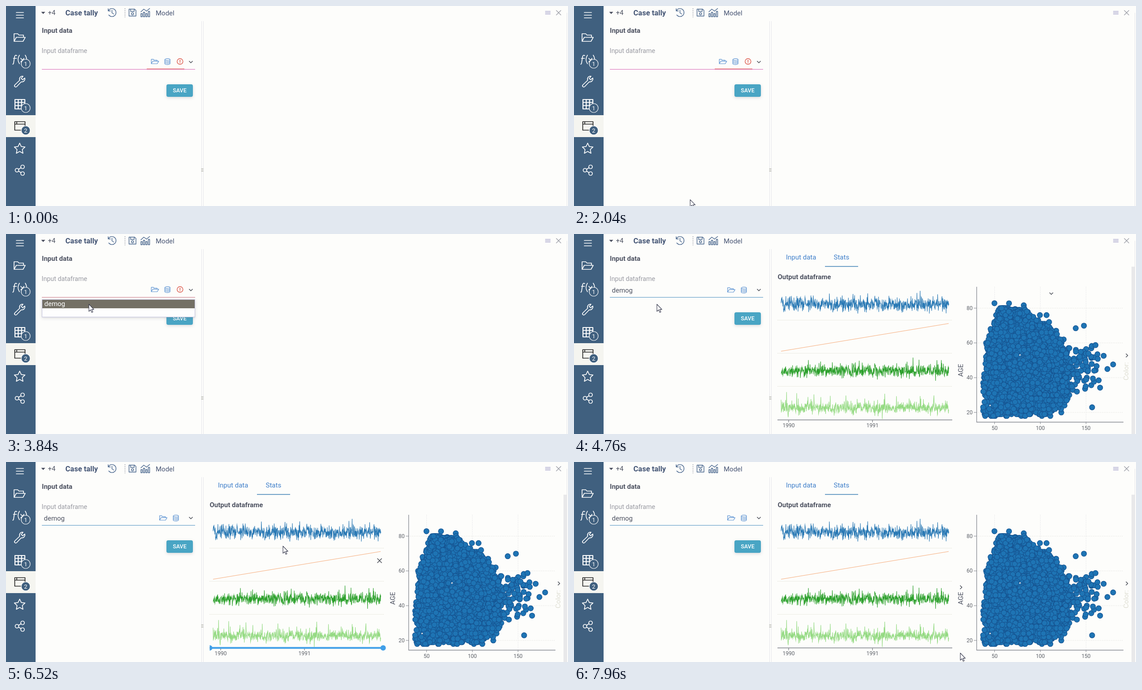
Animation of 1254x447 px, one loop 8 s. Source, as an HTML page with a canvas:

```html
<!DOCTYPE html>
<html lang="en">
<head>
<meta charset="utf-8">
<title>Case tally</title>
<style>
  html, body { margin: 0; width: 100%; height: 100%; overflow: hidden; background: #fdfdfb; }
  svg, canvas { position: absolute; left: 0; top: 0; width: 1254px; height: 447px; }
  text { font: 15px Roboto, sans-serif; fill: #4d5261; }
  .bold { font-weight: 700; }
  .axis { font-size: 12px; fill: #5c6068; }
  .side { fill: none; stroke: #fff; stroke-width: 1.7; stroke-linecap: round; stroke-linejoin: round; }
  .tool { fill: none; stroke: #46648c; stroke-width: 1.4; stroke-linejoin: round; stroke-linecap: round; }
  .pick { fill: none; stroke: #5b92d2; stroke-width: 1.2; stroke-linejoin: round; }
  .mark { fill: none; stroke: #4a4e57; stroke-width: 1.5; }
  .num { font-size: 13px; fill: #fff; text-anchor: middle; }
</style>
</head>
<body>
<svg viewBox="0 0 1254 447">
  <defs>
    <filter id="soft" x="-20%" y="-30%" width="140%" height="180%">
      <feDropShadow dx="0" dy="2" stdDeviation="3" flood-color="#667" flood-opacity=".25"/>
    </filter>
    <path id="folder" d="M.7 11V1.2h4.8l1.6 1.9h6.6v2.3M.7 11 4 5.4h13.3L14 11z"/>
    <g id="disks">
      <ellipse cx="6.5" cy="2.7" rx="5.8" ry="2.1"/>
      <path d="M.7 2.7v9c0 2.8 11.6 2.8 11.6 0v-9M.7 5.7c0 2.8 11.6 2.8 11.6 0M.7 8.7c0 2.8 11.6 2.8 11.6 0"/>
    </g>
    <path id="cross" d="M-5-5 5 5M5-5-5 5"/>
    <path id="chevron" d="M-4-2 0 2 4-2"/>
  </defs>

  <!-- sidebar -->
  <rect width="66" height="447" fill="#40607f"/>
  <rect y="244" width="66" height="49" fill="#f5f5f0"/>
  <g class="side">
    <path d="M23 14.5h16M23 20.5h16M23 26.5h16"/>
    <path d="M18 79V62h8l3 3h10v5M18 79l5-9h20l-5 9z"/>
    <path d="M24 111c-3-2-4.5 0-5 3l-2 13c-.5 3-1 3-2 3M16.5 117h7M30 110c-4 6-4 13 0 19M33 117l7 8M40 117l-7 8M43 110c4 6 4 13 0 19"/>
    <path d="M42 161l-5 4-3-3 4-5c-6-1-9 4-7.5 9L20 176c-3 3 1 7 4 4l10-10.5c5 1 9-3 8-8.5z"/>
    <path d="M20 209h22v21H20zM20 215.5h22M20 222.5h22M27.3 209v21M34.7 209v21" stroke-width="2.2"/>
    <path d="M30.5 306.5l3.6 7.6 8.3 1.1-6.1 5.7 1.6 8.3-7.4-4.1-7.4 4.1 1.6-8.3-6.1-5.7 8.3-1.1z"/>
    <circle cx="24.5" cy="367" r="4"/><circle cx="37" cy="359.5" r="4"/><circle cx="37" cy="374.5" r="4"/>
    <path d="M28 365l5.5-3.500M28 369l5.5 3.500"/>
    <path d="M19.5 258.5h23v19h-23zM20 264h22M24 259v4.5" stroke="#222"/>
  </g>
  <g id="badges"></g>

  <!-- top bar -->
  <path d="M78.5 13h9l-4.5 5z" fill="#4d5261"/>
  <text x="93.500" y="20">+4</text>
  <text class="bold" x="132.500" y="20.500" style="font-size:16.5px;fill:#435474">Case tally</text>
  <g class="tool">
    <path d="M228.500 10.500a9 9 0 1 1 .8 9.500M228 6v5h5M236.500 9.500v6l4 2.500"/>
    <path d="M265.500 5v21" stroke-dasharray="2 2" stroke="#9a9da8" stroke-linecap="butt"/>
    <path d="M274.500 7h12.500l3 3v12.500h-15.500zM278 7v5h8V7"/><circle cx="282.300" cy="17.300" r="2.400"/>
    <path d="M301 24v-7h3v7zM306.500 24V14h3v10zM312 24v-7h3v7zM317.500 24V12h3v12zM301 13l6.500-6 6 4.500 7-6"/>
    <path d="M1203.500 12h11M1203.500 15h11M1203.500 18h11" stroke="#b3b0d2"/>
    <use href="#cross" x="1233" y="15" stroke="#9a9ca5"/>
  </g>
  <text x="334" y="20.500" style="fill:#4b5876">Model</text>

  <!-- panel edges -->
  <path d="M436.500 34v413M440.500 34v413M1251.500 15v432" stroke="#e6e6ea"/>
  <path d="M435.500 363.500h5M435.500 366.500h5M435.500 369.500h5" stroke="#a5a69a"/>

  <!-- form -->
  <text class="bold" x="80" y="60">Input data</text>
  <text x="79.500" y="104.500" style="font-size:14.3px;fill:#9a9ba3">Input dataframe</text>
  <g data-on="0 4000">
    <use class="pick" href="#folder" x="323.500" y="118"/>
    <use class="pick" href="#disks" x="353.700" y="117"/>
    <circle cx="388.300" cy="124" r="6.500" fill="none" stroke="#dc5a4c" stroke-width="1.400"/>
    <path d="M388.300 120.500v4.500M388.300 126.300v1.700" stroke="#dc5a4c" stroke-width="1.700"/>
  </g>
  <g data-on="0 3480">
    <path d="M80 141.500h342" stroke="#d863b4"/>
    <path d="M314 140.500h84" stroke="#e2614c"/>
  </g>
  <path data-on="3480 4000" d="M80 141.500h342" stroke="#cc7484"/>
  <g data-on="4000 8000">
    <text x="84.500" y="130.500">demog</text>
    <use class="pick" href="#folder" x="342" y="119"/>
    <use class="pick" href="#disks" x="372.500" y="118"/>
    <path d="M80 141.500h342" stroke="#4a8fc0"/>
  </g>
  <use class="mark" href="#chevron" x="412.500" y="125"/>
  <rect x="358" y="175" width="59" height="28" rx="4" fill="#48a5c4" filter="url(#soft)"/>
  <text x="387.500" y="193" text-anchor="middle" style="font-size:12.5px;font-weight:500;fill:#fff">SAVE</text>

  <g data-on="2760 3480">
    <rect x="179.500" y="157.500" width="103" height="33" rx="3" fill="#fdfdea" stroke="#dcdfe3"/>
    <text x="185.500" y="179" style="font-size:13.8px;fill:#e0705f">Can't be empty</text>
  </g>
  <g data-on="3560 4000">
    <rect x="80.500" y="146.500" width="341" height="39" fill="#fefefe" stroke="#c3c3de" filter="url(#soft)"/>
    <rect x="81" y="147" width="340" height="19" fill="#747065"/>
    <text x="85.500" y="161" style="fill:#fff">demog</text>
  </g>
</svg>

<canvas id="plots" width="1254" height="447" data-on="4360 8000"></canvas>

<svg viewBox="0 0 1254 447">
  <g data-on="4360 8000">
    <text x="473" y="57" style="fill:#3f7fca">Input data</text>
    <text x="579.500" y="57" style="fill:#3f7fca">Stats</text>
    <path d="M560 72.500h74" stroke="#3a7db4" stroke-width="1.600"/>
    <text class="bold" x="454.500" y="101">Output dataframe</text>
    <rect x="1244" y="73" width="7" height="374" fill="#e9e9ea"/>
    <g id="ticks"></g>
    <text transform="translate(867.500 319) rotate(-90)">AGE</text>
    <text transform="translate(1236.500 327) rotate(-90)" style="font-size:15.5px;fill:#deded2">Color:</text>
    <use class="mark" href="#chevron" transform="translate(1233.500 271.500) rotate(-90)"/>
    <use class="mark" href="#chevron" x="1065" y="133" data-on="4360 6000"/>
  </g>
  <g data-on="6040 7400">
    <path d="M456 415.500h385" stroke="#419fe8" stroke-width="4"/>
    <path d="M454.500 409.500a6 6 0 0 1 0 12z" fill="#419fe8"/>
    <circle cx="841.500" cy="415.500" r="6" fill="#419fe8"/>
    <use class="mark" href="#cross" x="833.500" y="220.500" stroke-width="1.200"/>
  </g>
  <use class="mark" href="#chevron" transform="translate(863.500 280) rotate(-90)" data-on="7400 8000"/>
  <path id="cursor" d="M0 0v16l3.700-3.400 2.600 5.700 2.500-1.100-2.600-5.600h5z" fill="#fff" stroke="#33364a" stroke-width="1.100" stroke-linejoin="round"/>
</svg>

<script>
const LOOP = 8000;

// time, x, y of the pointer tip
const route = [
  [2000, 262, 447], [2160, 245, 360], [2400, 245, 360], [2760, 184, 135],
  [3560, 184, 135], [3800, 185, 157], [5080, 185, 157], [5880, 612, 68],
  [6400, 618, 188], [6760, 618, 188], [7400, 862, 270], [7940, 862, 427]
];

let seed = 20;
function rnd() {
  seed = (seed * 1664525 + 1013904223) % 4294967296;
  return seed / 4294967296;
}
const gauss = () => Math.sqrt(-2 * Math.log(1 - rnd())) * Math.cos(2 * Math.PI * rnd());
const expo = () => -Math.log(1 - rnd());
const smooth = u => u * u * (3 - 2 * u);

function addSvg(parent, name, attrs, text = "") {
  const el = document.createElementNS("http://www.w3.org/2000/svg", name);
  for (const key in attrs) el.setAttribute(key, attrs[key]);
  el.textContent = text;
  document.getElementById(parent).append(el);
}

function badge(y, n) {
  addSvg("badges", "circle", { cx: 44, cy: y, r: 10, fill: "#40607f", stroke: "#fff", "stroke-width": 1.2 });
  addSvg("badges", "text", { class: "num", x: 44, y: y + 4.5 }, n);
}

const tick = (label, x, y, anchor) =>
  addSvg("ticks", "text", { class: "axis", x, y, "text-anchor": anchor }, label);

const ctx = document.getElementById("plots").getContext("2d");

function line(points, color, width = 1, dash = []) {
  ctx.beginPath();
  points.forEach(([x, y]) => ctx.lineTo(x, y));
  ctx.strokeStyle = color;
  ctx.lineWidth = width;
  ctx.setLineDash(dash);
  ctx.stroke();
}

// daily noise over two years; lift adds rare upward peaks
function series(mid, sd, lift, color) {
  const pts = [];
  for (let i = 0; i <= 730; i++) {
    const peak = rnd() < 0.08 ? lift * rnd() : 0;
    pts.push([462 + i * 0.513, mid + sd * gauss() - peak]);
  }
  line(pts, color, 1.1);
}

function drawLines() {
  for (const y of [192.5, 266.5, 340.5]) line([[454, y], [844, y]], "#e4e3d8", 1, [2, 1]);
  series(158, 8, 18, "#2878b4");
  line([[462, 262], [836, 200]], "#f6ac7c", 1.2);
  series(306, 7, 18, "#2ca02c");
  series(389, 6.5, 28, "#94da82");
  line([[454, 415.5], [844, 415.5]], "#7d8088", 1.5);
  [1990, 1991].forEach((year, i) => {
    const x = 479 + 187 * i;
    line([[x, 415], [x, 421]], "#7d8088", 1.3);
    tick(year, x, 432, "middle");
  });
}

const weightX = w => 836.5 + 2.04 * w;
const ageY = a => 476.5 - 3.885 * a;

function dot(x, y) {
  ctx.beginPath();
  ctx.arc(x, y, 5.9, 0, 2 * Math.PI);
  ctx.fill();
  ctx.stroke();
}

function drawAxes() {
  for (const w of [50, 100, 150]) {
    const x = weightX(w);
    line([[x, 118], [x, 420]], "#e4e4e6", 1, [2, 2]);
    line([[x, 420], [x, 425]], "#858890");
    tick(w, x, 438, "middle");
  }
  for (const a of [20, 40, 60, 80]) {
    const y = ageY(a);
    line([[898, y], [1226, y]], "#e4e4e0", 1, [2, 2]);
    line([[892, y], [898, y]], "#858890");
    tick(a, 889.5, y + 4, "end");
  }
  line([[898.5, 118], [898.5, 420.5], [1226, 420.5]], "#858890", 1.3);
}

// the crowd lies between a steep left side and an elliptic right side
const leftX = y => 914 + 38 * ((408 - y) / 243) ** 4;
const rightX = y => 918 + 176 * Math.sqrt(Math.max(0, 1 - ((y - 310) / 150) ** 2));

function drawScatter() {
  drawAxes();
  ctx.setLineDash([]);
  ctx.fillStyle = "#1e74b4";
  ctx.strokeStyle = "#175592";
  ctx.lineWidth = 1.2;

  for (let i = 0; i < 60; i++) dot(1142 + 22 * gauss(), ageY(48 + 9 * gauss()));
  for (let i = 0; i < 24; i++) dot(978 + 22 * gauss(), 178 - 11 * expo());
  for (let i = 0; i < 2300; i++) {
    const y = ageY(Math.round(18 + 62 * rnd()));
    const l = leftX(y), r = rightX(y);
    const stray = rnd() < 0.1;
    const x = stray ? r + 9 * expo() : l + (r - l) * rnd();
    dot(Math.max(913, x + 2 * gauss()), y);
  }
}

badge(129, 1);
badge(228, 1);
badge(278, 2);
drawLines();
drawScatter();

function pointerAt(t) {
  const i = route.findIndex(p => p[0] > t);
  if (i < 1) return route[i < 0 ? route.length - 1 : 0].slice(1);
  const [t0, x0, y0] = route[i - 1], [t1, x1, y1] = route[i];
  const u = smooth((t - t0) / (t1 - t0));
  return [x0 + (x1 - x0) * u, y0 + (y1 - y0) * u];
}

const parts = [...document.querySelectorAll("[data-on]")].map(el => [el, ...el.dataset.on.split(" ").map(Number)]);
const cursor = document.getElementById("cursor");
const start = performance.now();

function render() {
  const t = (performance.now() - start) % LOOP;
  for (const [el, from, to] of parts) el.style.display = t >= from && t < to ? "" : "none";
  cursor.style.display = t >= route[0][0] ? "" : "none";
  const [x, y] = pointerAt(t);
  cursor.setAttribute("transform", `translate(${x.toFixed(1)} ${y.toFixed(1)})`);
  requestAnimationFrame(render);
}
render();
</script>
</body>
</html>
```
